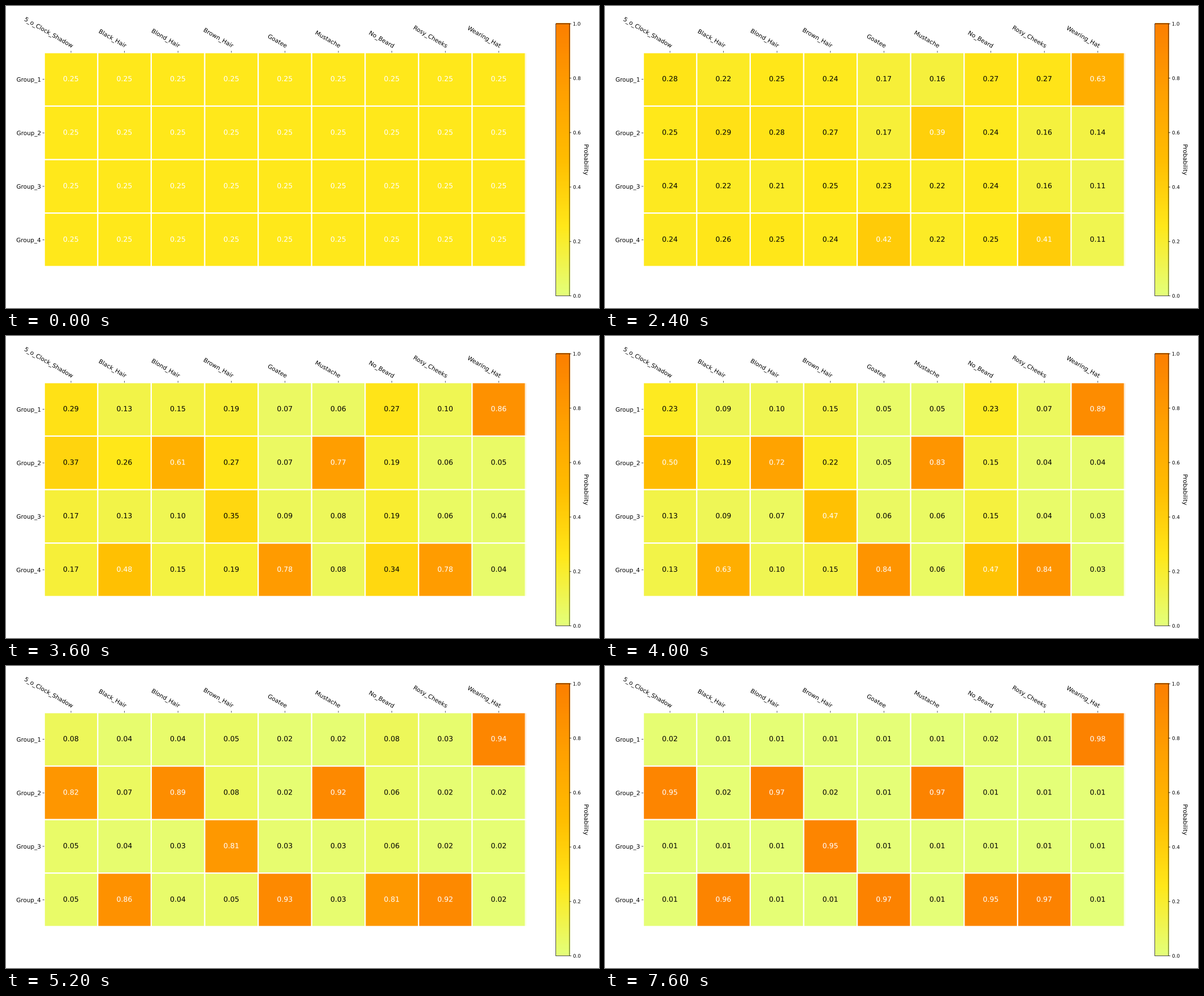
Recreate the animation shown at these times as a matplotlib script. Size 1049 px wide and 534 px high, loop 8000 ms.

```python
import numpy as np
import matplotlib.pyplot as plt
from matplotlib.animation import FuncAnimation
from matplotlib.patches import PathPatch, Rectangle
from matplotlib.textpath import TextPath
from matplotlib.transforms import Affine2D

W, H, DPI = 1049, 534, 64
SMALL, MID, BIG = 8.67, 10.4, 12.5     # text sizes in pixels
LINE = 0.7 * 72 / DPI                  # thin line width in points
X0, Y0, STEP = 67.7, 82.4, 94.6        # heatmap corner and cell pitch
CELL = 92.3
ROWS, FRAMES = 4, 20

# label, winning group, step at which it takes off, other group that leans off, lean
COLUMNS = [
    ("5_o_Clock_Shadow", 1, 9.2, 0, 0.57),
    ("Black_Hair", 3, 8.35, 1, 0.68),
    ("Blond_Hair", 1, 7.5, 2, -0.36),
    ("Brown_Hair", 2, 9.4, 1, 0.4),
    ("Goatee", 3, 5.8, 2, 0.3),
    ("Mustache", 1, 6.0, 0, -0.3),
    ("No_Beard", 3, 9.45, 0, 0.4),
    ("Rosy_Cheeks", 3, 5.85, 0, 0.55),
    ("Wearing_Hat", 0, 4.3, 1, 0.22),
]


def column(step, winner, onset, other, lean):
    """Winner's odds grow quadratically after a soft onset; the rest is shared."""
    rise = 0.8 * np.log1p(np.exp((step - onset) / 0.8))
    odds = (3 ** -0.5 + 0.41 * rise) ** 2
    p = np.ones(ROWS)
    p[other] = np.exp(lean * min(1, step / onset) ** 3)
    p[winner] = 0
    p /= p.sum() * (1 + odds)
    p[winner] = odds / (1 + odds)
    return p


def probabilities(step):
    return np.column_stack([column(step, *rule) for _, *rule in COLUMNS])


plt.rcParams["font.family"] = "DejaVu Sans"
fig = plt.figure(figsize=(W / DPI, H / DPI), dpi=DPI, facecolor="white")
ax = fig.add_axes([0, 0, 1, 1])
cmap = plt.get_cmap("Wistia")


def shape(text, x, y, size, align=0.0, angle=0, ref=None):
    """Outline of a text on baseline y; align runs from 0 (left) to 1 (right)."""
    ink = TextPath((0, 0), ref or text, size=size).get_extents()
    place = (Affine2D().translate(-ink.x0 - align * ink.width, 0).scale(1, -1)
             .rotate_deg(angle).translate(x, y))
    return TextPath((0, 0), text, size=size).transformed(place)


def write(*args, **kw):
    return ax.add_patch(PathPatch(shape(*args, **kw), fc="black", lw=0, snap=False))


def box(x, y, w, h, **style):
    return ax.add_patch(Rectangle((x, y), w, h, snap=False, **style))


def tick(x1, y1, x2, y2):
    ax.plot([x1, x2], [y1, y2], color="black", lw=LINE, solid_capstyle="butt",
            snap=False)


# Colour bar
BAR_X, BAR_Y, BAR_W, BAR_H = 972.5, 31.4, 24.4, 481.1
ax.imshow(np.linspace(1, 0, 256)[:, None], cmap=cmap, aspect="auto",
          extent=(BAR_X, BAR_X + BAR_W, BAR_Y + BAR_H, BAR_Y))
box(BAR_X, BAR_Y, BAR_W, BAR_H, fill=False, ec="black", lw=LINE)
for v in np.linspace(0, 1, 6):
    y = BAR_Y + BAR_H * (1 - v)
    tick(BAR_X + BAR_W, y, BAR_X + BAR_W + 3.2, y)
    write(f"{v:.1f}", 1003.6, y + 3.2, SMALL)
write("Probability", 1022.9, 272, MID, align=0.5, angle=90)

# Axis labels
centers_x = X0 + STEP * (np.arange(len(COLUMNS)) + 0.5)
centers_y = Y0 + STEP * (np.arange(ROWS) + 0.5)
for x, (label, *_) in zip(centers_x, COLUMNS):
    tick(x, Y0 - 3, x, Y0)
    write(label, x + 0.9, Y0 - 8.3, MID, align=1, angle=30)
for r, y in enumerate(centers_y):
    tick(X0 - 3, y, X0, y)
    write(f"Group_{r + 1}", X0 - 6.6, y + 4, MID, align=1)

# Cells, with a faint sliver beyond the right-hand grid line
cells, numbers, slivers = {}, {}, []
for r in range(ROWS):
    top = Y0 + 1.1 + STEP * r
    for c in range(len(COLUMNS)):
        cells[r, c] = box(X0 + 1.1 + STEP * c, top, CELL, CELL, lw=0)
        numbers[r, c] = write("0.25", 0, 0, BIG)
    slivers.append(box(919, top, 1, CELL, lw=0, alpha=0.4))

ax.set_xlim(0, W)
ax.set_ylim(H, 0)
ax.axis("off")


def update(step):
    p = probabilities(step)
    limit = p.max() / 2
    for (r, c), cell in cells.items():
        v = p[r, c]
        cell.set_facecolor(cmap(v))
        numbers[r, c].set_path(shape(f"{v:.2f}", centers_x[c] - 0.35, centers_y[r] + 3.3,
                                     BIG, align=0.5, ref="0.25"))
        numbers[r, c].set_facecolor("white" if v > limit else "black")
    for r, sliver in enumerate(slivers):
        sliver.set_facecolor(cmap(p[r, -1]))
    return [*cells.values(), *numbers.values(), *slivers]


anim = FuncAnimation(fig, update, frames=FRAMES, interval=400, repeat=True,
                     repeat_delay=0, blit=False)
plt.show()
```
